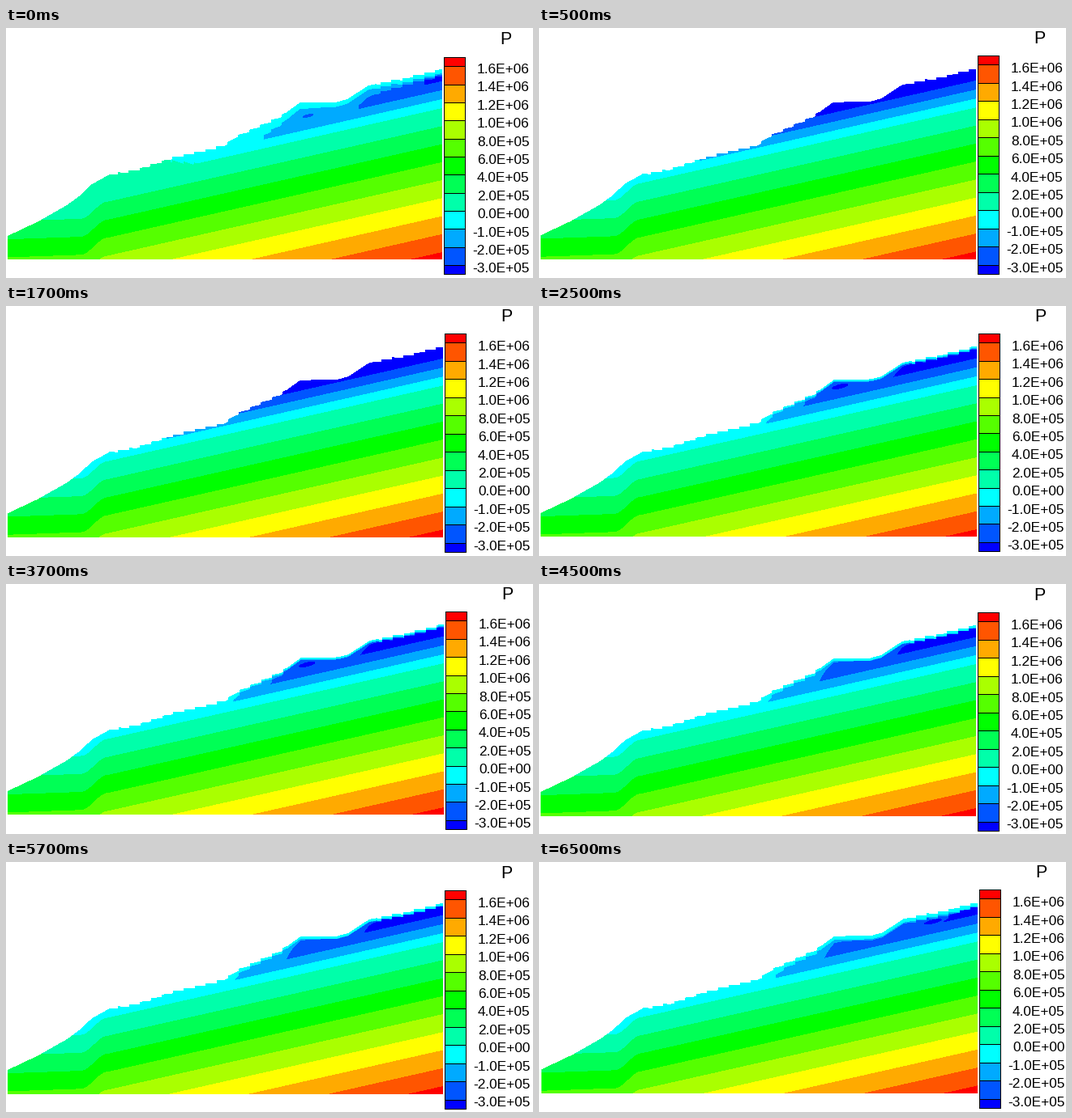
Recreate the animation shown at these times as a matplotlib script. Size 650 px wide and 309 px high, loop 8000 ms.

```python
import numpy as np
import matplotlib.pyplot as plt
from matplotlib.animation import FuncAnimation
from matplotlib.colors import to_rgb

W, H, DPI = 650, 309, 100
LEFT, RIGHT, FLOOR, BAR_TOP = 2, 538, 286, 36
SLOPE = 0.2265
VALUES = [1e5 * v for v in (*range(16, -1, -2), -1, -2, -3)]
COLORS = np.array([to_rgb(c) for c in (
    "#ff0000", "#ff5500", "#ffaa00", "#ffff00", "#aaff00", "#55ff00", "#00ff00",
    "#00ff55", "#00ffaa", "#00ffff", "#00aaff", "#0055ff", "#0000ff")])
WET = VALUES.index(0)

OUTLINE = [(2, 257), (40, 239), (75, 219), (90, 208), (106, 193), (126, 182), (160, 176),
           (205, 161), (268, 146), (285, 134), (338, 110), (362, 92.5), (408, 91.5),
           (421, 88), (447, 71), (492, 62.5), (538, 51)]

# Each scene: shift, floor, bar top, start of the wet zone, fade of the zone tips,
# then start, film and bulge of the three suction zones
SCENES = [
    (0, 286, 36, 203, 40, [(318, 5, 9), (435, 6, 11), (516, 8, 1)]),
    (1, 286, 34, 0, 1, [(198, 0, 0), (280, 0, 0), (330, 0, 0)]),
    (2, 285, 34, 0, 8, [(279, 2, 5), (325, 3, 4), (434, 3.5, 8)]),
    (1, 287, 35, 0, 8, [(282, 3, 5), (344, 3.5, 14), (440, 3.5, 10)]),
    (3, 286, 34, 0, 8, [(290, 4.5, 5), (350, 6, 12), (496, 5, 8)]),
]
# Isolated spots: level and slanted ellipse (x, y, half length, half height)
SPOTS = {0: (11, 372.5, 108.5, 7, 2), 2: (12, 370, 100.5, 10, 2.8), 4: (12, 483, 74.5, 11, 2.5)}


def surface(x):
    """Key points, broken into level ledges where the slope is eroded."""
    eroded = ((x > 127) & (x < 345)) | (x > 455)
    ledges = SLOPE * ((x - 138) % 13.5 - 6.75)
    return np.interp(x, *zip(*OUTLINE)) + np.where(eroded, ledges, 0)


def contour(x, value):
    """Straight rise on the right, a smooth knee, then almost level on the left."""
    height = 99 + 22.25 * value / 2e5
    t = np.clip((125 - x) / 33, 0, 1)
    knee = 21 * t * t * (3 - 2 * t) + 0.035 * np.maximum(92 - x, 0)
    return height + SLOPE * (RIGHT - np.maximum(x, 125)) + knee


def vertical_shift(floor, top):
    return 0.35 * (floor - FLOOR + top - BAR_TOP)


def paint_terrain(picture, index):
    dx, floor, top, wet_start, fade, zones = SCENES[index]
    left, right = LEFT + dx // 3, RIGHT + dx
    columns, rows = np.arange(left, right), np.arange(floor)
    x = LEFT + (columns + 0.5 - left) * (RIGHT - LEFT) / (right - left)
    y = rows[:, None] + 0.5 - vertical_shift(floor, top)
    ground = surface(x)

    level = sum((y < contour(x, v)).astype(int) for v in VALUES[:WET])
    mouth = ground + 3 + 0.35 * (x - wet_start)
    level[(x > wet_start) & (y < np.minimum(contour(x, 0), mouth))] = WET + 1
    for k, (start, film, bulge) in enumerate(zones, WET + 1):
        upper = ground + film + bulge * np.exp(-np.maximum(x - start, 0) / fade)
        level[(x > start) & (y > upper) & (y < contour(x, VALUES[k]))] = k + 1
    if index in SPOTS:
        k, cx, cy, rx, ry = SPOTS[index]
        slanted = y - cy + SLOPE * (x - cx)
        level[((x - cx) / rx) ** 2 + (slanted / ry) ** 2 < 1] = k

    solid = y > ground
    picture[:floor, left:right][solid] = COLORS[level[solid]]


def paint_bar(picture, index):
    dx, floor, top = SCENES[index][:3]
    left, right, bottom = 540 + dx, 566 + dx, floor + 18
    cell = (bottom - top) / len(VALUES)
    inner = [int(top + cell * (i + 0.525)) for i in range(len(VALUES))]
    edges = [top, *inner, bottom]
    picture[top:bottom + 1, left:right + 1] = 0
    for a, b, color in zip(edges, edges[1:], COLORS):
        picture[a + 1:b, left + 1:right] = color


def paint_scene(index):
    picture = np.ones((H, W, 3))
    paint_terrain(picture, index)
    paint_bar(picture, index)
    return picture


def scientific(value):
    mantissa, exponent = f"{value:.1e}".split("e")
    return f"{mantissa}E{exponent}"


fig = plt.figure(figsize=(W / DPI, H / DPI), dpi=DPI, facecolor="white")
ax = fig.add_axes([0, 0, 1, 1])
ax.axis("off")
pictures = [paint_scene(i) for i in range(len(SCENES))]
image = ax.imshow(pictures[0], extent=(0, W, H, 0), interpolation="nearest", aspect="auto")

style = dict(family="Liberation Sans", color="black", va="center_baseline")
title = ax.text(0, 0, "P", ha="center", fontsize=15.5, **style)
labels = [ax.text(0, 0, scientific(v), ha="right", fontsize=12.4, **style) for v in VALUES]


def update(tick):
    index = (tick + 3) // 4
    dx, floor, top = SCENES[index][:3]
    dy = vertical_shift(floor, top)
    image.set_data(pictures[index])
    title.set_position((616 + dx, 12 + dy))
    for i, label in enumerate(labels):
        label.set_position((645.5 + dx, 50 + 22.4 * i + dy))
    return [image, title, *labels]


anim = FuncAnimation(fig, update, frames=16, interval=500, repeat=True, repeat_delay=0,
                     init_func=lambda: update(0), blit=False)
plt.show()
```
